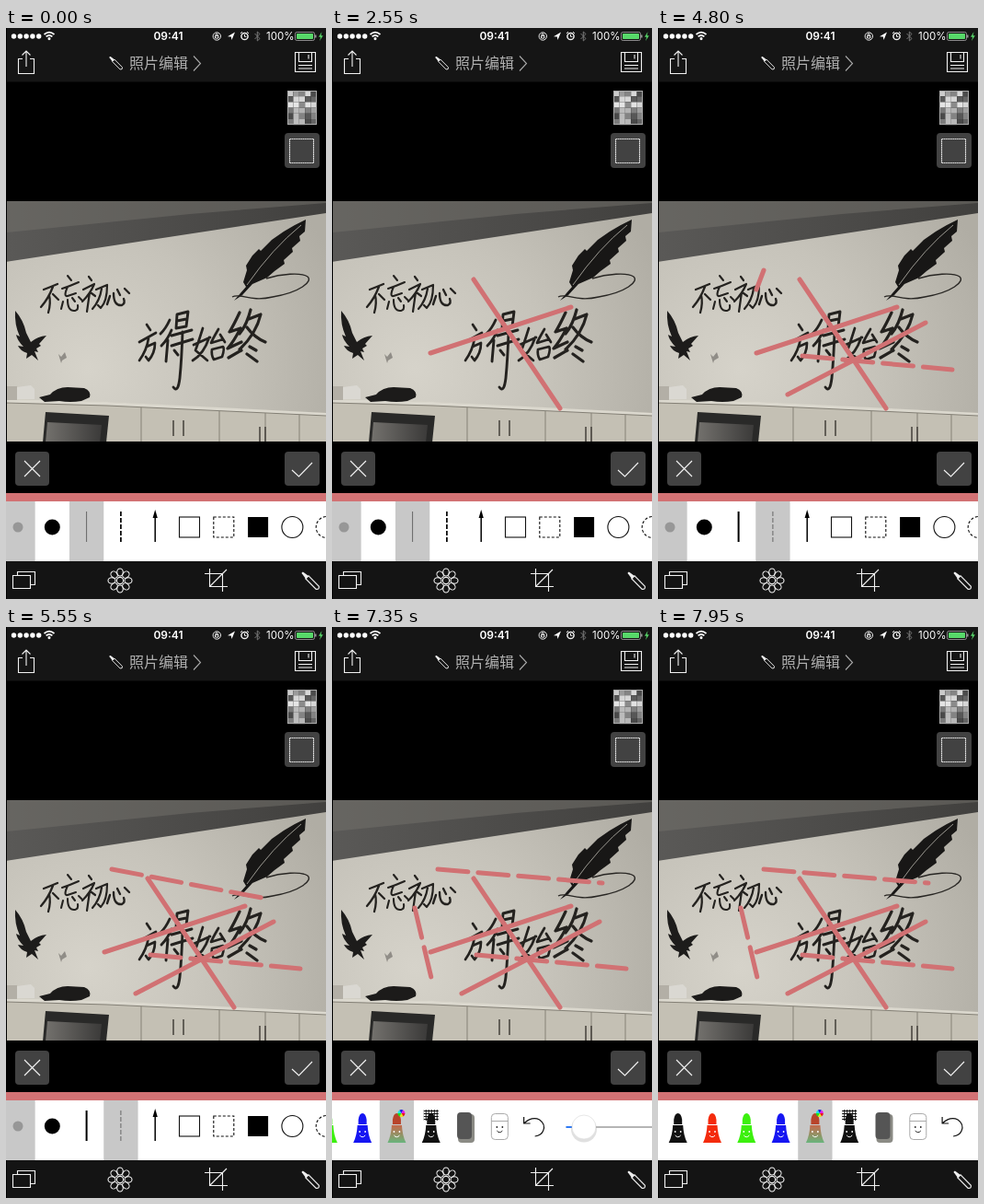
These frames come from a looping animation (348x620 px, 8 s). An HTML page:

```html
<!DOCTYPE html>
<html lang="zh">
<head>
<meta charset="utf-8">
<title>照片编辑</title>
<style>
html, body { margin: 0; width: 100%; height: 100%; overflow: hidden; background: #000; }
svg { display: block; width: 100vw; height: 100vh; }
text { font-family: Inter, Roboto, "Liberation Sans", sans-serif; fill: #fff; }
.cjk { font-family: "Noto Sans CJK SC", "Noto Sans CJK", sans-serif; }
.icon { fill: none; stroke: #f2f2f2; stroke-width: 1.1; }
.ink { fill: none; stroke: #24221f; stroke-linecap: round; stroke-linejoin: round; }
.pink { fill: none; stroke: #d17173; stroke-width: 5; stroke-linecap: round; }
</style>
</head>
<body>
<svg viewBox="0 0 348 620" preserveAspectRatio="none">
  <defs>
    <radialGradient id="wall" gradientUnits="userSpaceOnUse" cx="90" cy="370" r="290">
      <stop offset="0" stop-color="#d6d3ca"/><stop offset=".5" stop-color="#c6c3ba"/><stop offset="1" stop-color="#b0ada4"/>
    </radialGradient>
    <linearGradient id="ceiling" x1="0" x2="1">
      <stop offset="0" stop-color="#5a5957"/><stop offset="1" stop-color="#41403e"/>
    </linearGradient>
    <linearGradient id="screen" x1="0" x2="1">
      <stop offset="0" stop-color="#73716d"/><stop offset="1" stop-color="#3b3a39"/>
    </linearGradient>
    <linearGradient id="mix" x1="0" y1="0" x2="0" y2="1">
      <stop offset="0" stop-color="#c4694c"/><stop offset="1" stop-color="#68b57c"/>
    </linearGradient>
    <pattern id="hatch" width="3" height="3" patternUnits="userSpaceOnUse">
      <path d="M0 .5H3M.5 0V3" stroke="#111"/>
    </pattern>
    <clipPath id="frame"><path d="M1 188H348V449H1Z"/></clipPath>
  </defs>

  <rect width="348" height="620"/>

  <g clip-path="url(#frame)">
    <rect y="188" width="348" height="262" fill="url(#wall)"/>
    <path d="M0 188H348V201L0 254Z" fill="url(#ceiling)"/>
    <path d="M0 188H348V190L200 202L0 222Z" fill="#75726d" opacity=".5"/>
    <path d="M0 403L110 406L348 418V450H0Z" fill="#c4c0b4"/>
    <path d="M0 403L110 406L348 418V421L110 410L0 407Z" fill="#dbd8ce"/>
    <path d="M0 407L110 410L348 421" fill="none" stroke="#837f75"/>
    <path d="M147 412V450M232 416V450M282 418V450M319 420V450" stroke="#858177"/>
    <path d="M182 426V443M193 426V443M276 433V449M282 433V449" stroke="#4b4842" stroke-width="1.6"/>
    <path d="M12 390L27 388L31 392V403H12Z" fill="#dad8d2"/>
    <path d="M0 389H12V404H0Z" fill="#b3afa6"/>
    <path d="M36 401L48 398Q55 390 67 390L85 391Q93 394 91 401L82 405Q70 407 58 405L42 406Z" fill="#1c1b1a"/>
    <path d="M43 417L112 421L109 450H40Z" fill="#292928"/>
    <path d="M45 428L104 431L102 450H43Z" fill="url(#screen)"/>

    <path d="M10 307Q19 317 22 331L27 341Q34 335 44 334L36 343L38 345L33 348L35 352L31 351L35 361L28 355L22 359L23 353Q15 350 13 345L19 346Q12 339 11 333L15 335Q9 322 10 307Z" fill="#1d1c1b"/>
    <path d="M57 354L60 357L64 352L66 358L61 361L60 364Z" fill="#908d87"/>

    <path d="M326 208L325 221L319 226L320 231L311 239L312 243L302 252L303 256L292 264L284 271L268 278L257 290L248 296L261 281L258 276L262 263L261 258L268 247L275 240L277 242L289 230L302 221L314 214Z" fill="#181716"/>
    <path d="M321 214Q290 239 262 279" fill="none" stroke="#aaa7a0" stroke-width=".9"/>
    <path d="M246 292C255 287 265 298 290 292C320 287 334 275 328 270C321 265 299 267 283 272" fill="none" stroke="#282623" stroke-width="1.4"/>
    <g class="ink" id="script"></g>
  </g>

  <g id="strokes" class="pink"></g>

  <rect x="1" width="347" height="58.5" fill="#151515"/>
  <g id="signal" fill="#fff"></g>
  <g fill="none" stroke="#fff" stroke-width="1.7">
    <path d="M41.5 7Q47 2.4 52.5 7M43.6 9.4Q47 6.6 50.4 9.4"/><circle cx="47" cy="11.6" r=".7"/>
  </g>
  <text x="176.5" y="13" font-size="12" font-weight="600" text-anchor="middle">09:41</text>
  <g fill="none" stroke="#eee">
    <circle cx="229.3" cy="9" r="4.2"/>
    <path d="M227.5 8.5h3.5v2.5h-3.5zM228.2 8V7a1 1 0 0 1 2 0v1"/>
    <path d="M241 9.2L249 4.5L245.5 13L244.8 9.4Z" fill="#fff" stroke="none"/>
    <circle cx="259.5" cy="9" r="3.6" stroke-width="1.5"/><path d="M259.5 7V9.4H261.4M255 6L257 4M264 6L262 4"/>
    <path d="M270.5 6L276 11.5L273.3 14V4L276 6.5L270.5 12" stroke="#777"/>
  </g>
  <text x="283" y="13" font-size="11.5">100%</text>
  <rect x="314.5" y="4.5" width="21" height="9" rx="1.8" fill="none" stroke="#aaa" stroke-width=".8"/>
  <rect x="316" y="6" width="18" height="6" rx=".8" fill="#57d869"/>
  <path d="M336.8 7.5V10.5" stroke="#aaa" stroke-width="1.3"/>
  <path d="M343.5 4L340 9.7H342.2L341 14L344.8 8.2H342.5Z" fill="#57d869"/>

  <g class="icon">
    <path d="M18 33.5H13.5V49.5H30.5V33.5H26M22 42V25M17.5 29.5L22 25L26.5 29.5"/>
    <path d="M314.5 26.5H336.5V47.5H314.5ZM318.5 26.5V36.5H332.5V26.5M329 29V33.5M318 40.5H333M318 44H333"/>
    <path d="M204 30.5L211.5 38.5L204 46.5" stroke="#aaa"/>
  </g>
  <text class="cjk" x="134" y="44" font-size="16" style="fill:#b0b0b0">照片编辑</text>

  <g id="mosaic"></g>
  <g fill="#424242">
    <rect x="303" y="114" width="38" height="38" rx="4"/>
    <rect x="10" y="460" width="37" height="37" rx="4"/>
    <rect x="303" y="460" width="38" height="37" rx="4"/>
  </g>
  <rect class="icon" x="308.5" y="120.5" width="26" height="26" stroke-dasharray="1.4 .6"/>
  <path class="icon" d="M20 470L37 487M37 470L20 487M311 480L318.5 487L333 472"/>

  <rect y="505" width="348" height="9" fill="#d27274"/>
  <rect y="514" width="348" height="65" fill="#fff"/>
  <g id="tray"></g>

  <rect x="1" y="579" width="347" height="41" fill="#141414"/>
  <g class="icon">
    <path d="M12.5 594V590.5H31.5V604.5H27M7.5 594.5H26.5V608.5H7.5Z"/>
    <g id="flower"></g>
    <path d="M221.5 587V606.5H241M216 592.5H235.5V612M221.5 606.5L240 588"/>
  </g>
  <g id="pens"></g>
</svg>
<script>
const byId = id => document.getElementById(id);
const put = (id, html) => { byId(id).innerHTML = html; };
const range = n => [...Array(n).keys()];
const path = (d, attrs = "") => `<path d="${d}" ${attrs}/>`;

// Brush lettering on the wall, one entry per character: path, width
put("script", [
  ["M41 284Q49 281 56 278M51 281Q46 294 38 303M47 290Q49 299 46 309M51 289L57 295", 2.3],
  ["M67 269L71 274M61 283Q70 280 79 276M67 281Q62 292 67 291L76 288M62 297L60 305M67 295Q67 308 75 307Q79 306 78 301M72 293L75 297M79 292L83 296", 2.1],
  ["M90 270L93 274M84 284L96 278Q92 288 83 297M91 287L88 308M93 288L97 291M98 284L110 279Q110 297 103 304L100 301M104 283Q102 296 94 305", 2.2],
  ["M113 291L110 300M117 288Q117 302 126 301Q130 299 128 294M121 284L124 290M129 283L134 288", 2.4],
  ["M153 322L157 328M145 341Q154 336 163 331M155 337Q153 350 145 361M153 346L162 342Q162 353 155 361L152 357", 2.7],
  ["M178 317Q174 326 168 332M180 328Q176 338 169 345M176 339L174 362M185 326L186 311L198 308L196 324L185 326M186 318L196 316M180 334L202 328M180 345L203 338M192 330Q191 360 189 380Q187 397 182 390M183 350L187 355", 2.9],
  ["M214 326Q208 345 206 350L219 361M221 336Q215 354 203 361M204 344L222 336M231 327Q224 339 223 342L236 338M233 333L238 341M224 349Q223 355 226 360L235 357Q238 348 236 346L224 349", 2.7],
  ["M254 309Q248 322 243 330L255 326Q248 340 241 348L256 341M242 358L256 350M266 306Q262 322 254 332M264 316L277 311Q272 332 254 349M262 325Q270 336 282 341M265 346L272 350M262 354L273 362", 3.2],
].map(([d, w]) => path(d, `stroke-width="${w}"`)).join(""));

put("signal", range(5).map(i => `<circle cx="${8.5 + i * 6.8}" cy="9" r="2.7"/>`).join(""));

put("mosaic", range(30).map(i => {
  const v = Math.sin(i * 12.99 + 4) * 437.58;
  const g = Math.round(70 + 160 * (v - Math.floor(v)));
  return `<rect x="${306 + (i % 5) * 6.4}" y="${68 + Math.floor(i / 5) * 6.2}" width="6.4" height="6.2" fill="rgb(${g},${g},${g})"/>`;
}).join("") + '<rect x="306.5" y="68.5" width="31" height="36" fill="none" stroke="#aaa"/>');

put("flower", range(8).map(i =>
  `<ellipse cx="124" cy="591" rx="3.3" ry="4" transform="rotate(${i * 45} 124 600)"/>`).join("") +
  '<circle cx="124" cy="600" r="3.6"/>');

const pen = (x, y, k) => `<g transform="translate(${x} ${y}) rotate(-45) scale(${k})">` +
  path("M-2.2 -5L-1 -12Q0 -14 1 -12L2.2 -5Z", 'fill="#eee"') +
  path("M-2.2 -5H2.2V11Q0 14 -2.2 11Z", 'fill="none" stroke="#eee" stroke-width="1.2"') + "</g>";
put("pens", pen(119.5, 38, 0.75) + pen(331, 600, 1));

// Scrolling tray: markers, slider, then shape tools
const PITCH = 37.3, TOOLS = 502.4, REST = 489.4;
const cell = (x, id = "") =>
  `<rect ${id && `id="${id}"`} x="${x - PITCH / 2}" y="514" width="${PITCH}" height="65" fill="#c8c8c8"/>`;
const at = (x, body) => `<g transform="translate(${x} 0)">${body}</g>`;
const face = (y, c) =>
  `<circle cx="-3" cy="${y}" r=".9" fill="${c}"/><circle cx="3" cy="${y}" r=".9" fill="${c}"/>` +
  path(`M-3 ${y + 4}Q0 ${y + 7.5} 3 ${y + 4}`, `fill="none" stroke="${c}"`);
const marker = (c, top = c) =>
  path("M-4.5 540V535Q-3.5 528 0 528Q3.5 528 4.5 535V540Z", `fill="${top}"`) +
  path("M-5.5 541H5.5Q6 552 10 560H-10Q-6 552 -5.5 541Z", `fill="${c}"`) + face(548, "#fff");
const wheel = range(6).map(i =>
  path("M0 0L4 0A4 4 0 0 1 2 3.46Z",
    `fill="hsl(${i * 60},80%,50%)" transform="translate(5 528) rotate(${i * 60})"`)).join("");

const pens = [
  marker("#111"), marker("#f42b0d"), marker("#3cf00e"), marker("#1616f2"),
  marker("url(#mix)", "#b8442c") + wheel,
  marker("#111") + '<rect x="-8" y="524" width="16" height="12" fill="url(#hatch)"/>',
  '<rect x="-8" y="529" width="18" height="31" rx="4" fill="#8b8b85"/><rect x="-9" y="527" width="16" height="29" rx="4" fill="#555"/>',
  '<rect x="-9" y="528.5" width="18" height="28" rx="4" fill="#fff" stroke="#aaa"/>' + path("M-9 536.5H9", 'stroke="#aaa"') + face(543, "#222"),
  path("M-11 532V539H-4M-11 539Q-2 531 6 535Q13 540 10 547Q8 552 1 553", 'fill="none" stroke="#111" stroke-width="1.2"'),
];

const thin = 'fill="none" stroke="#111" stroke-width="1.1" ';
const box = 'x="-11" y="531" width="22" height="22" ';
const tools = [
  '<circle cy="542" r="5.5" fill="#979797"/>',
  '<circle cy="542" r="8.5"/>',
  path("M0 525V558", 'id="solid"'),
  path("M0 525V558", 'id="dashed" stroke-dasharray="5 2"'),
  path("M0 558V530", 'stroke="#000" stroke-width="1.5"') + path("M0 523L2.6 532H-2.6Z"),
  `<rect ${box + thin}/>`,
  `<rect ${box + thin} stroke-dasharray="3 2"/>`,
  `<rect ${box}/>`,
  `<circle cy="542" r="11.5" ${thin}/>`,
  `<circle cy="542" r="11.5" ${thin} stroke-dasharray="3 2"/>`,
];

const toolX = i => TOOLS + i * PITCH;
const penX = i => (i + 0.5) * PITCH;
put("tray",
  cell(penX(4)) + cell(TOOLS) + cell(toolX(2), "pick") +
  pens.map((p, i) => at(penX(i), p)).join("") +
  path("M352 543H472", 'stroke="#b5b5b5" stroke-width="2"') +
  path("M352 543H361", 'stroke="#2f7bf6" stroke-width="2"') +
  '<circle cx="371.4" cy="545.5" r="14" fill="#000" opacity=".12"/>' +
  '<circle cx="371.4" cy="543" r="13" fill="#fff" stroke="#ddd" stroke-width=".7"/>' +
  tools.map((p, i) => at(toolX(i), p)).join(""));

// Each line keeps its start; its end follows keys of [time, x, y]
const lines = [
  { from: [154, 273], keys: [[1950, 190, 327], [2250, 248, 413]] },
  { from: [107, 353], keys: [[2400, 185, 328], [2550, 260, 303]] },
  { from: [141, 398], keys: [[2850, 185, 375], [3150, 291, 320]] },
  { from: [157, 356], dash: true, keys: [[4200, 200, 360], [4500, 320, 371]] },
  { from: [115, 263], dash: true, keys: [[4800, 107, 284], [5100, 165, 325], [5400, 262, 310], [5700, 294, 278]] },
  { from: [90, 305], dash: true, keys: [[6150, 135, 325], [6450, 241, 352], [6600, 241, 352], [6750, 108, 381]] },
];
put("strokes", lines.map(l => path("", l.dash ? 'stroke-dasharray="33 11"' : "")).join(""));
const strokes = [...byId("strokes").children];

function tip(keys, t) {
  const next = keys.findIndex(k => k[0] > t);
  if (next < 0) return keys[keys.length - 1].slice(1);
  if (next === 0) return null;
  const [a, b] = [keys[next - 1], keys[next]];
  const u = (t - a[0]) / (b[0] - a[0]);
  return [a[1] + (b[1] - a[1]) * u, a[2] + (b[2] - a[2]) * u];
}

// A flick towards the first marker, then a damped bounce past the edge
const EDGE = 97.4;
function scroll(t) {
  if (t < 7350) return REST - (REST - EDGE) * Math.max(0, (t - 7050) / 300) ** 1.4;
  const s = (t - 7350) / 150;
  return (EDGE - 230 * s) * Math.exp(-1.4 * s);
}

function choose(id, picked, width) {
  const el = byId(id);
  el.setAttribute("stroke", picked ? "#666" : "#000");
  el.setAttribute("stroke-width", picked ? 1 : width);
}

function draw(ms) {
  const t = Math.floor((ms % 8000) / 150) * 150;
  lines.forEach((l, i) => {
    const end = tip(l.keys, t);
    strokes[i].setAttribute("d", end ? `M${l.from}L${end}` : "");
  });
  const dashed = t >= 3900;
  choose("solid", !dashed, 2);
  choose("dashed", dashed, 1.7);
  byId("pick").setAttribute("x", toolX(dashed ? 3 : 2) - PITCH / 2);
  byId("tray").setAttribute("transform", `translate(${-scroll(t)} 0)`);
}

const start = performance.now();
function tick() {
  draw(performance.now() - start);
  requestAnimationFrame(tick);
}
tick();
</script>
</body>
</html>
```
